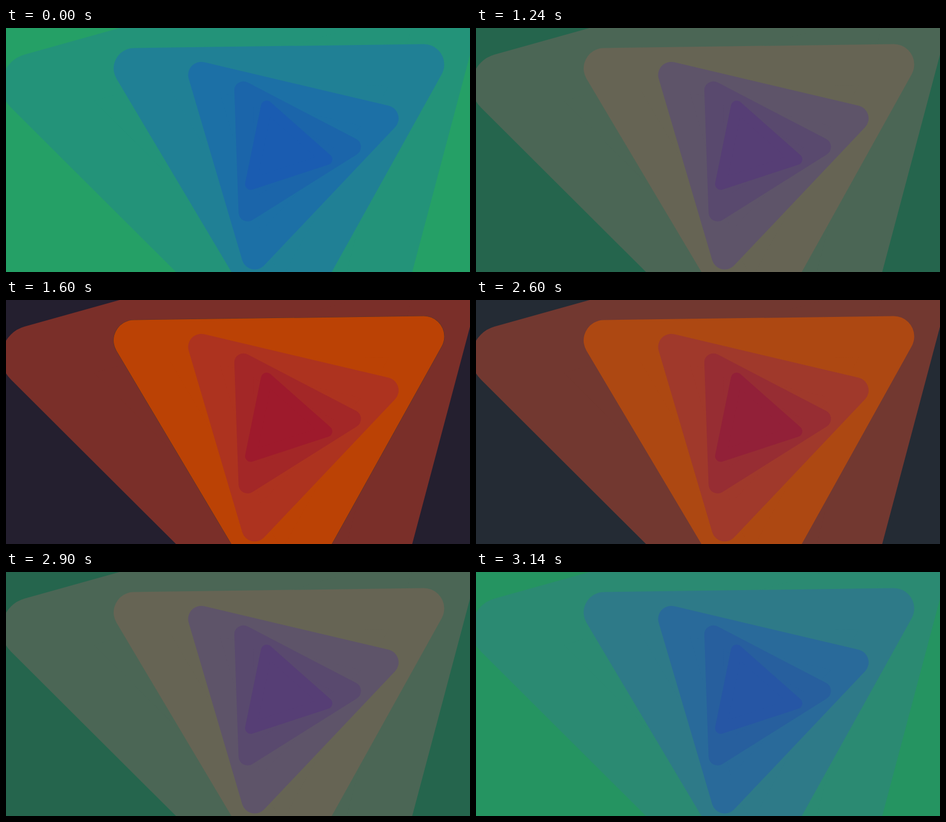
Write an HTML page that moves like this. It is 819 px wide and 432 px high and loops after 3.2 s.

```html
<!DOCTYPE html>
<html lang="en">
<head>
<meta charset="utf-8">
<title>Rounded triangles</title>
<style>
  html, body { margin: 0; width: 100%; height: 100%; overflow: hidden; }
  svg { display: block; width: 819px; height: 432px; }
  polygon { stroke-linejoin: round; }
</style>
</head>
<body>
<svg viewBox="0 0 819 432"></svg>
<script>
const HOLD = 1000, STEP = 60, STEPS = 11, HALF = 1600;
const svg = document.querySelector("svg");
const day = { background: [37, 160, 102] };
const night = { background: [36, 31, 47] };

// Each triangle is inset by its corner radius; the stroke rounds the corners.
const layers = [
  { points: "48,101 803,-111 600.5,653", radius: 56, day: [35, 147, 121], night: [122, 47, 41] },
  { points: "226,71.5 737.5,64.5 488.4,514", radius: 36, day: [32, 128, 149], night: [187, 66, 5] },
  { points: "344.5,83 670,160 439,404.5", radius: 23, day: [28, 112, 166], night: [173, 51, 31] },
  { points: "419,110.5 610.5,210.5 426.5,326.5", radius: 16, day: [27, 101, 170], night: [163, 39, 39] },
  { points: "460,138.5 566,232.5 432,276.5", radius: 10, day: [26, 92, 177], night: [158, 26, 44] }
];

function addTriangle({ points, radius }) {
  const shape = document.createElementNS("http://www.w3.org/2000/svg", "polygon");
  shape.setAttribute("points", points);
  shape.setAttribute("stroke-width", radius * 2);
  return svg.appendChild(shape);
}

function paint(shape, color) {
  shape.style.fill = shape.style.stroke = color;
}

const mix = (a, b, k) => `rgb(${a.map((v, i) => Math.round(v + (b[i] - v) * k))})`;

let rim;
layers.forEach((layer, i) => {
  if (i === 1) {
    rim = addTriangle({ points: layer.points, radius: layer.radius + 0.5 });
    paint(rim, "rgb(84,51,40)");
  }
  layer.shape = addTriangle(layer);
});

// The fade advances in discrete steps after each hold.
function fade(t) {
  const local = t % HALF;
  const k = local < HOLD ? 0 : (Math.floor((local - HOLD) / STEP) + 1) / STEPS;
  return t < HALF ? k : 1 - k;
}

function draw(now) {
  const k = fade(now % (2 * HALF));
  svg.style.background = mix(day.background, night.background, k);
  rim.style.display = k === 1 ? "" : "none";
  for (const layer of layers) paint(layer.shape, mix(layer.day, layer.night, k));
  requestAnimationFrame(draw);
}

draw(performance.now());
</script>
</body>
</html>
```
